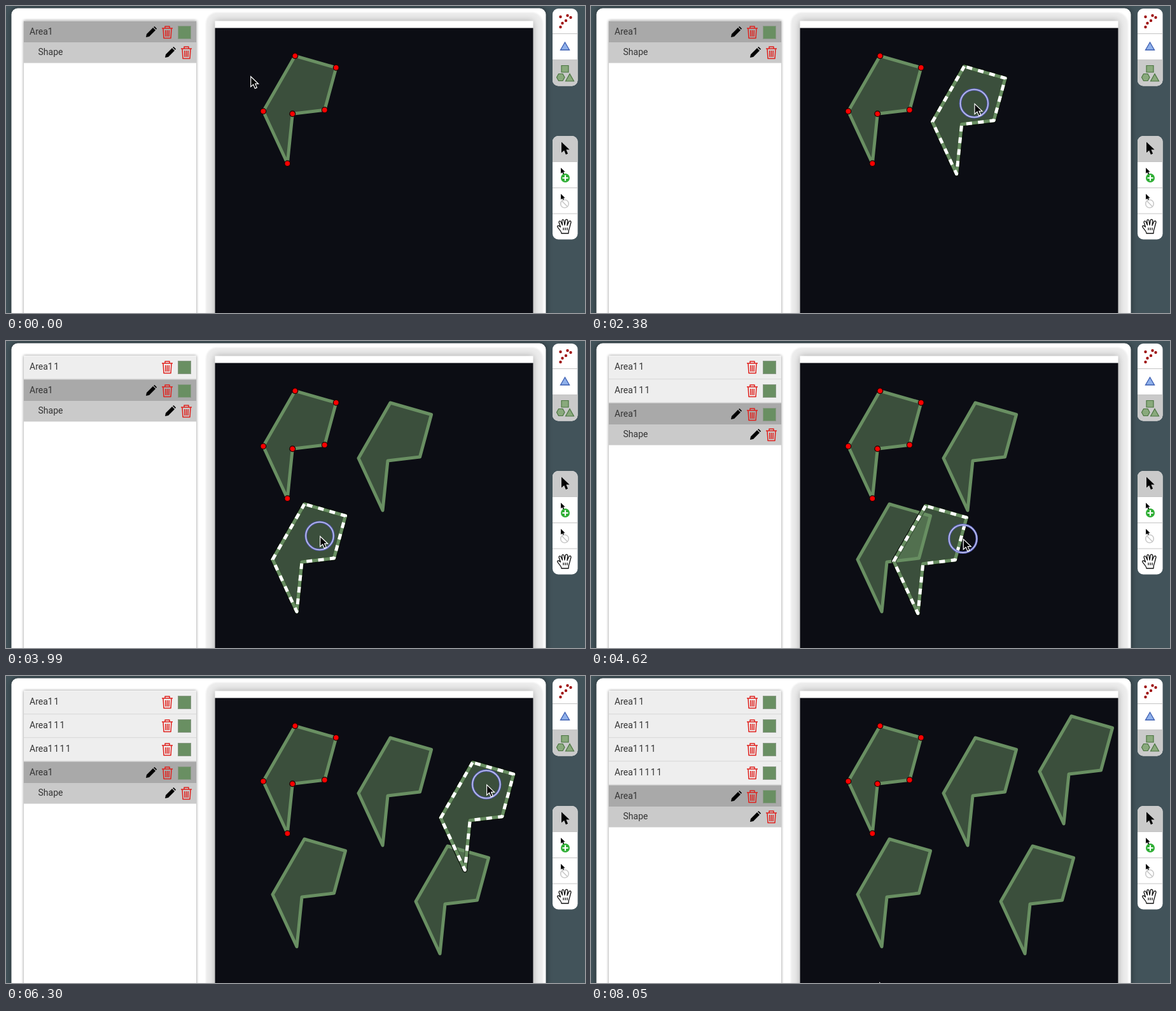
These frames come from a looping animation (910x482 px, 8120 ms). An HTML page:

```html
<!DOCTYPE html>
<html lang="en">
<head>
<meta charset="utf-8">
<title>Copying shapes</title>
<style>
  html, body { margin: 0; width: 100%; height: 100%; overflow: hidden; background: #42535a; }
  svg { display: block; }
  text { font: 14px Roboto, sans-serif; word-spacing: -2px; fill: #333; }
  .panel { fill: #fff; filter: drop-shadow(0 0 5px rgba(0, 0, 0, .45)); }
  .list { fill: #fff; filter: drop-shadow(0 0 2px rgba(0, 0, 0, .45)); }
  .halo { fill: #ededed; filter: blur(1px); }
  .board { fill: #fff; filter: drop-shadow(0 0 6px rgba(0, 0, 0, .3)); }
  .swatch { fill: #698f62; stroke: #8a9a86; }
  .shape, .hover, .edge, .dash { fill: none; stroke-width: 5; stroke-linejoin: round; }
  .shape { fill: rgba(105, 143, 98, .51); stroke: #698f62; }
  .hover { stroke: rgba(255, 0, 0, .5); stroke-width: 16; }
  .edge { stroke: #0a100a; stroke-width: 7.5; }
  .dash { stroke: #fff; stroke-dasharray: 9 9.5; stroke-dashoffset: -4; }
  .node { fill: #f00; stroke: #200; stroke-width: 1.3; }
  .tool { fill: #89a97c; stroke: #4a7440; stroke-width: 1.2; }
</style>
</head>
<body>
<svg width="910" height="482" viewBox="0 0 910 482">
  <defs>
    <path id="poly"/>
    <path id="arrow" d="M0 0V16L4 12.5L6.6 18.7L9.6 17.4L7 11.5H12Z"/>
    <path id="pencil" d="M0 17L1 12L11 2L15 6L5 16ZM12 1L13.5 0L17 3.5L16 5Z"/>
    <path id="trash" fill="none" stroke="#e0201c" stroke-width="1.5" stroke-linejoin="round"
      d="M0 4H17M5 4V1H12V4M2 4L3 19.5H14L15 4M5.7 7L6 17M8.5 7V17M11.3 7L11 17"/>
    <rect id="swatch" class="swatch" x="270.5" y="31.5" width="20" height="20"/>
    <clipPath id="clip"><path d="M328.5 34H829V482H328.5Z"/></clipPath>
    <clipPath id="tools1"><rect x="859" y="4" width="39.5" height="121.5" rx="9"/></clipPath>
    <clipPath id="tools2"><rect x="859" y="204" width="39.5" height="162.5" rx="9"/></clipPath>
  </defs>

  <rect class="panel" x="8.5" y="3.5" width="840" height="520" rx="10"/>
  <rect class="list" x="28" y="23" width="271" height="500"/>
  <g id="rows"></g>
  <g id="selected">
    <path fill="#a9a9a9" d="M28 23.500H299V57H28Z"/>
    <path fill="#cacaca" d="M28 57H299V89.500H28Z"/>
    <text x="37" y="45">Area1</text>
    <text x="50.5" y="77">Shape</text>
    <use href="#pencil" x="220" y="32"/>
    <use href="#trash" x="245" y="31"/>
    <use href="#swatch"/>
    <use href="#pencil" x="250" y="64"/>
    <use href="#trash" x="275" y="63"/>
  </g>

  <rect class="halo" x="314" y="10" width="530" height="520" rx="18"/>
  <rect class="board" x="328.5" y="23.5" width="500" height="500"/>
  <g clip-path="url(#clip)">
    <path fill="#0c0d14" d="M328 34.500H828.500V482H328Z"/>
    <use id="hover" href="#poly" class="hover"/>
    <g id="shapes"></g>
    <g id="nodes"></g>
    <g id="drag">
      <use href="#poly" class="edge"/>
      <use href="#poly" class="shape"/>
      <use href="#poly" class="dash"/>
    </g>
  </g>

  <g clip-path="url(#tools1)">
    <path fill="#fff" d="M859 4H899V126H859Z"/>
    <path fill="#cacaca" d="M859 84.500H899V126H859Z"/>
    <path stroke="#c4c4c4" d="M859 43.500H899M859 84.500H899"/>
  </g>
  <path stroke="#a01010" stroke-width="4.4" stroke-linecap="round"
    d="M871.5 17h0M882.5 15h0M887.5 18h0M880 23h0M874.5 27h0M871.5 33h0"/>
  <path fill="#8fb0ea" stroke="#3a5cb0" stroke-width="1.3" d="M871.5 69L878.5 57L885.5 69Z"/>
  <path class="tool" d="M873 93.5H884V104H873ZM865.5 112L868.5 106.5H875L878 112L875 117.5H868.5ZM879.5 118L886 106.5L892.5 118Z"/>

  <g clip-path="url(#tools2)">
    <path fill="#fff" d="M859 204H899V367H859Z"/>
    <path fill="#cacaca" d="M859 204H899V244.500H859Z"/>
    <path stroke="#c4c4c4" d="M859 244.500H899M859 285.500H899M859 326H899"/>
  </g>
  <use href="#arrow" transform="translate(873 213.5) scale(1.05)"/>
  <use href="#arrow" transform="translate(872 254) scale(.56)"/>
  <circle cx="879" cy="270" r="7" fill="#2fae35"/>
  <path stroke="#fff" stroke-width="2.2" d="M874.5 270H883.5M879 265.5V274.5"/>
  <use href="#arrow" transform="translate(872 295) scale(.56)"/>
  <g fill="none" stroke="#c9c9c9" stroke-width="1.6">
    <circle cx="878" cy="310.5" r="6.3"/>
    <path d="M873.5 306L882.5 315"/>
  </g>
  <path fill="#fff" stroke="#111" stroke-width="1.3" stroke-linejoin="round"
    d="M873 357C873 353 867 349 866.5 346Q868 343.5 871.5 347L869 339.5Q869 336.5 872 338.5L874.5 344L873.8 337Q875 334 877 336.8L878 344L879.5 335.8Q882 334 882.8 337L882 344.5L885 338Q888 336.5 888 339.5L886 347Q884 352 884 357ZM876 352V348M879 352V348M882 352V348"/>

  <g id="press" fill="none">
    <circle r="21.8" stroke="#5d63c0" stroke-width="3.6"/>
    <circle r="21.8" stroke="#cfd1ee" stroke-width="1.3"/>
  </g>
  <use id="cursor" href="#arrow" x=".7" y=".7" stroke="#fff" stroke-width="1.2"/>
</svg>
<script>
  const LOOP = 8120, STEP = 70, LAG = 35, APPROACH = 280;
  const $ = id => document.getElementById(id);

  const corners = [[0, 0], [64.5, 18.5], [46.5, 85], [-4, 91], [-12, 169], [-50, 87]];
  const first = [454.3, 78.3];

  // Each copy is pulled off the one before it: the pointer hovers, presses at
  // `grab`, drags for `span` ms and lets go at `drop`, leaving it at `place`.
  const copies = [
    { hover: 910, press: 1960, span: 400, drop: 2730, grab: [459, 135], place: [604, 97] },
    { hover: 2940, press: 3430, span: 450, drop: 4060, grab: [628, 147], place: [469, 256] },
    { hover: 4060, press: 4410, span: 320, drop: 5110, grab: [493, 306], place: [694, 267] },
    { hover: 5600, press: 5810, span: 645, drop: 6790, grab: [711, 317], place: [755, 63] }
  ];
  copies.forEach((copy, i) => {
    copy.from = i ? copies[i - 1].place : first;
    copy.start = copy.press + STEP;
  });

  // Pointer moves: start, span, target
  const home = [384, 110];
  const moves = [
    [0, 560, [455, 105]],
    [840, 280, [457, 157]],
    [1330, 350, [459, 133]],
    ...copies.flatMap(({ press, start, span, grab, from, place }) => [
      [press - APPROACH, APPROACH, grab],
      [start, span, grab.map((g, k) => g + place[k] - from[k])]
    ]),
    [7070, 630, [453, 490]],
    [7980, STEP, [453, 481]]
  ];

  const smooth = f => f * f * (3 - 2 * f);
  const progress = (t, start, span) => smooth(Math.min(1, Math.max(0, (t - start) / span)));
  const pointerAt = t => moves.reduce((at, [start, span, to]) =>
    at.map((p, k) => p + (to[k] - p) * progress(t, start, span)), home);

  const within = (t, from, until) => t >= from && t < until;
  const move = (el, [x, y]) => el.setAttribute('transform', `translate(${x} ${y})`);
  const show = (el, on) => el.setAttribute('visibility', on ? 'visible' : 'hidden');

  $('poly').setAttribute('d', `M${corners.join('L')}Z`);
  $('nodes').innerHTML = corners.map(([x, y]) => `<circle class="node" cx="${x}" cy="${y}" r="4.4"/>`).join('');
  move($('nodes'), first);
  $('shapes').innerHTML = [first, ...copies.map(copy => copy.place)].map(([x, y]) =>
    `<use href="#poly" class="shape" x="${x}" y="${y}"/>`).join('');
  $('rows').innerHTML = copies.map((_, i) => `<g transform="translate(0 ${37 * i})">
    <path fill="#eee" d="M28 23.500H299V60H28Z"/>
    <path stroke="#c8c8c8" d="M28 60H299"/>
    <text x="37" y="45">Area1${' 1'.repeat(i + 1)}</text>
    <use href="#trash" x="245" y="31"/>
    <use href="#swatch"/></g>`).join('');
  const shapes = $('shapes').children, rows = $('rows').children;

  function draw(now) {
    const t = Math.floor(now % LOOP / STEP) * STEP;
    copies.forEach(({ drop }, i) => {
      show(rows[i], t >= drop);
      show(shapes[i + 1], t >= drop);
    });
    move($('selected'), [0, 37 * copies.filter(copy => t >= copy.drop).length]);

    const leaving = within(t, 7140, 7350);
    const hovered = copies.find(copy => within(t, copy.hover, copy.start + STEP));
    show($('hover'), hovered || leaving);
    move($('hover'), hovered ? hovered.from : copies.at(-1).place);

    const dragged = copies.find(copy => within(t, copy.start + STEP, copy.drop));
    show($('drag'), dragged);
    if (dragged) {
      const hand = pointerAt(t - LAG);
      move($('drag'), dragged.from.map((p, k) => p + hand[k] - dragged.grab[k]));
    }

    const tip = pointerAt(t);
    move($('cursor'), tip);
    move($('press'), tip);
    show($('press'), within(t, 700, 910) || copies.some(copy => within(t, copy.press, copy.drop)));
    requestAnimationFrame(draw);
  }
  requestAnimationFrame(draw);
</script>
</body>
</html>
```
